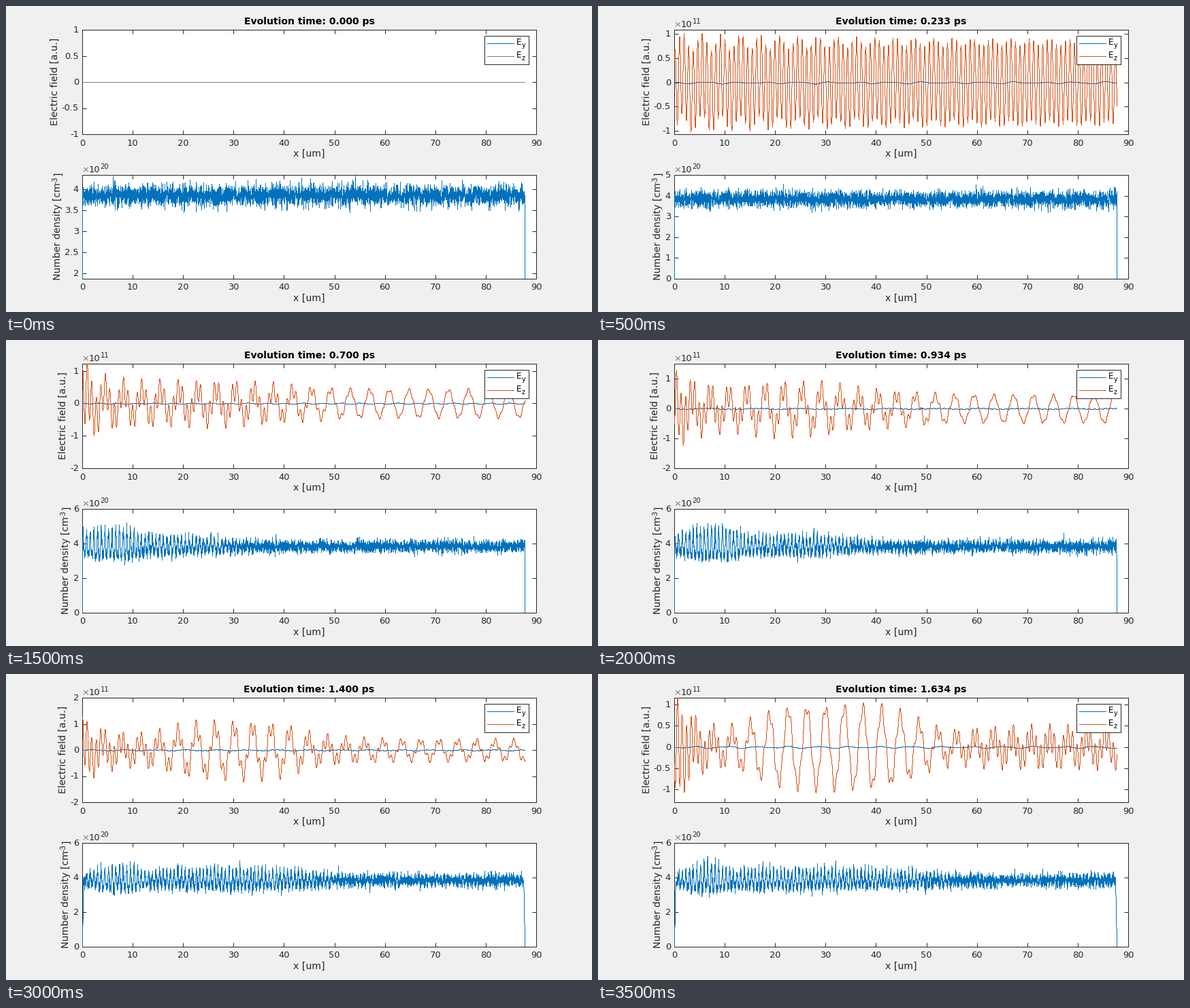
Recreate the animation shown at these times as a matplotlib script. Size 861 by 451 pixels, loop 4 s.

```python
import numpy as np
import matplotlib.pyplot as plt
from matplotlib.animation import FuncAnimation
from matplotlib.patches import Rectangle

W, H, DPI = 861, 451, 64
PX = 72 / DPI                      # points per pixel
INK, BLUE, ORANGE, GREY = "#262626", "#0072bd", "#d95319", "#7b7b7b"
LENGTH, SPAN = 87.7, 90            # plasma length and axis range, um
LASER, RIPPLE = 0.9, 0.724         # laser and density ripple periods, um
STEP_PS = 0.2334

plt.rcParams["font.family"] = "DejaVu Sans"
plt.rcParams["path.simplify"] = False

x = np.linspace(0, LENGTH, 4400)
shots = []


def packet(amp, centre, width):
    """Flat-topped wave packet."""
    return amp * np.exp(-((x - centre) / width) ** 4)


def decay(amp, length):
    """Falls off from the left edge."""
    return amp * np.exp(-x / length)


def shot(field, density, exponent=True, fast=0, fast_crest=0, slow=0, slow_crest=0,
         period=3.7, chirp=0, ripple=0, noise=0.18, edge=0.04):
    """Curves of one time step; field and density are (low, high, tick step)."""
    rng = np.random.default_rng(len(shots) + 11)
    u = x - slow_crest
    ez = (fast * np.cos(2 * np.pi * (x - fast_crest) / LASER)
          + slow * np.cos(2 * np.pi * (u / period - chirp * u ** 2)))
    ey = np.zeros_like(x)
    if exponent:
        for p in (1.1, 3.7, 6.1, 9.0):
            ey += 0.009 * rng.normal() * np.sin(2 * np.pi * (x / p + rng.random()))
    a = 2 * np.pi * (x - 0.8) / RIPPLE
    rho = 3.85 + ripple * (np.cos(a) + 0.3 * np.cos(2 * a)) + rng.normal(0, noise, x.size)
    rho *= np.clip(np.minimum(x, LENGTH - x) / edge, 0, 1)
    shots.append(dict(field=field, density=density, exponent=exponent,
                      ez=ez, ey=ey, rho=rho))


shot((-1, 1, 0.5), (1.87, 4.33, 0.5), exponent=False, noise=0.125, edge=0.01)
shot((-1.07, 1.09, 0.5), (0, 5, 1), fast=0.84, fast_crest=1.0,
     slow=0.04 + decay(0.17, 40), slow_crest=28.4, period=3.83, noise=0.2, edge=0.02)
shot((-1.36, 1.02, 0.5), (0, 6, 2),
     fast=0.1 + decay(1.15, 3) + packet(0.15, 60, 16), fast_crest=1.42,
     slow=0.06 + packet(0.46, 32, 20), slow_crest=11.67, period=3.838,
     ripple=0.05 + packet(0.6, 5, 6) + packet(0.25, 12, 12))
shot((-2, 1.22, 1), (0, 6, 2),
     fast=0.05 + decay(0.7, 3) + packet(0.3, 15, 30), fast_crest=1.82,
     slow=0.42, slow_crest=15.45, period=3.677, chirp=0.000163,
     ripple=0.05 + packet(0.4, 6, 6) + packet(0.35, 12, 18), edge=0.06)
shot((-2, 1.5, 1), (0, 6, 2),
     fast=0.05 + decay(0.7, 4) + packet(0.3, 18, 30), fast_crest=1.3,
     slow=0.45 + packet(0.2, 24, 10), slow_crest=18, period=3.65, chirp=0.0002,
     ripple=0.08 + packet(0.4, 7, 6) + packet(0.35, 18, 20), edge=0.08)
shot((-2, 2, 1), (0, 6, 2),
     fast=0.05 + decay(0.55, 6) + packet(0.2, 20, 35) + packet(0.28, 29, 6.5),
     fast_crest=0.74,
     slow=decay(0.45, 4) + packet(0.52, 62, 42) + packet(0.45, 28, 6),
     slow_crest=21.5, period=3.624, chirp=0.000227,
     ripple=0.12 + packet(0.55, 7, 6) + packet(0.4, 31, 10), edge=0.15)
shot((-2, 2, 1), (0, 6, 2),
     fast=0.12 + decay(0.85, 5) + packet(0.2, 30, 25), fast_crest=0.9,
     slow=0.35 + packet(0.55, 30, 14), slow_crest=30, period=3.7,
     ripple=0.1 + packet(0.4, 6, 5) + packet(0.38, 28, 20), edge=0.2)
shot((-1.3, 1.16, 0.5), (0, 6, 2),
     fast=0.14 + decay(1.1, 4) + packet(0.17, 78, 22), fast_crest=0.6,
     slow=0.25 + packet(0.68, 32, 18), slow_crest=11.4, period=3.706,
     ripple=0.1 + packet(0.35, 6, 4) + packet(0.35, 25, 26), edge=0.25)

fig = plt.figure(figsize=(W / DPI, H / DPI), dpi=DPI, facecolor="#f0f0f0")
LEFT, RIGHT = 112, 779                     # pixel columns of the frames
FIELD, DENSITY = (34, 188), (248, 401)     # pixel rows of top and bottom edges


def panel(rows):
    top, bottom = rows
    ax = fig.add_axes([LEFT / W, 1 - (bottom + 1) / H, (RIGHT - LEFT) / W,
                       (bottom - top) / H])
    ax.set_xlim(0, SPAN)
    ax.set_xticks(range(0, SPAN + 1, 10))
    ax.tick_params(direction="in", length=6 * PX, width=PX, color=INK, top=True,
                   right=True, labelbottom=False, labelleft=False)
    for spine in ax.spines.values():
        spine.set(linewidth=PX, edgecolor=INK)
    return ax


def curve(ax, color, xs=(), ys=()):
    # Snapping to pixel centres keeps the line one pixel wide
    return ax.plot(xs, ys, color=color, lw=PX, snap=True, zorder=3)[0]


top_ax, low_ax = panel(FIELD), panel(DENSITY)
ey_line, ez_line = curve(top_ax, BLUE), curve(top_ax, ORANGE)
rho_line = curve(low_ax, BLUE)

# Overlay in pixel coordinates for text and legend
stage = fig.add_axes([0, 0, 1, 1], zorder=5)
stage.axis("off")
stage.set_xlim(0, W)
stage.set_ylim(H, 0)


def write(px, py, text, size=13, ha="left", color=INK, **kw):
    return stage.text(px, py, text, fontsize=size * PX, ha=ha, va="baseline",
                      color=color, rotation_mode="anchor", **kw)


def power(base, exponent):
    return [write(111.5, base, "×", color=GREY), write(121.5, base, "10"),
            write(138.5, base - 5, exponent, 10)]


MID = (LEFT + RIGHT) / 2
for _, bottom in (FIELD, DENSITY):
    write(MID, bottom + 33.5, "x [um]", 14, "center")
    for v in range(0, SPAN + 1, 10):
        write(LEFT + v * (RIGHT - LEFT) / SPAN, bottom + 17.5, str(v), ha="center")
title = write(MID, 27, "", 14, "center", "black", weight="bold")
field_label = write(76, 111, "Electric field [a.u.]", 14, "center", rotation=90)
density_label = [write(80, 404.5, "Number density [cm", 14, rotation=90),
                 write(75, 261.5, "-3", 11, rotation=90),
                 write(80, 250.5, "]", 14, rotation=90)]
field_power = power(31, "11")
power(245, "20")

stage.add_patch(Rectangle((703, 44), 65, 42, fc="white", ec=INK, lw=PX))
for row, sub, color in ((54, "y", BLUE), (73, "z", ORANGE)):
    legend_ez = curve(stage, color, [707, 746], [row + 1, row + 1])
    write(749.5, row + 3, "E", 12, color="black")
    write(757.5, row + 7, sub, 9.6, color="black")

tick_texts = []


def scale(ax, rows, limits):
    low, high, step = limits
    top, bottom = rows
    ticks = np.arange(np.ceil(low / step), np.floor(high / step) + 1) * step
    ax.set_ylim(low, high)
    ax.set_yticks(ticks)
    for v in ticks:
        y = bottom - (v - low) / (high - low) * (bottom - top)
        tick_texts.append(write(107, y + 5, f"{v + 0:g}", ha="right"))


def draw(i):
    s = shots[i]
    while tick_texts:
        tick_texts.pop().remove()
    scale(top_ax, FIELD, s["field"])
    scale(low_ax, DENSITY, s["density"])
    for line, name in ((ey_line, "ey"), (ez_line, "ez"), (rho_line, "rho")):
        line.set_data(x, s[name])

    title.set_text(f"Evolution time: {i * STEP_PS:.3f} ps")
    for t in field_power:
        t.set_visible(s["exponent"])
    for line in (ez_line, legend_ez):
        line.set_color(ORANGE if s["exponent"] else GREY)

    # Axis labels stand clear of the tick labels
    field_label.set_x(88 if s["field"][2] == 1 else 76)
    shift = 0 if s["density"][2] == 0.5 else 12
    for t, base in zip(density_label, (80, 75, 80)):
        t.set_x(base + shift)
    return []


anim = FuncAnimation(fig, draw, frames=len(shots), interval=500, repeat=True,
                     repeat_delay=0, init_func=lambda: draw(0))
plt.show()
```
